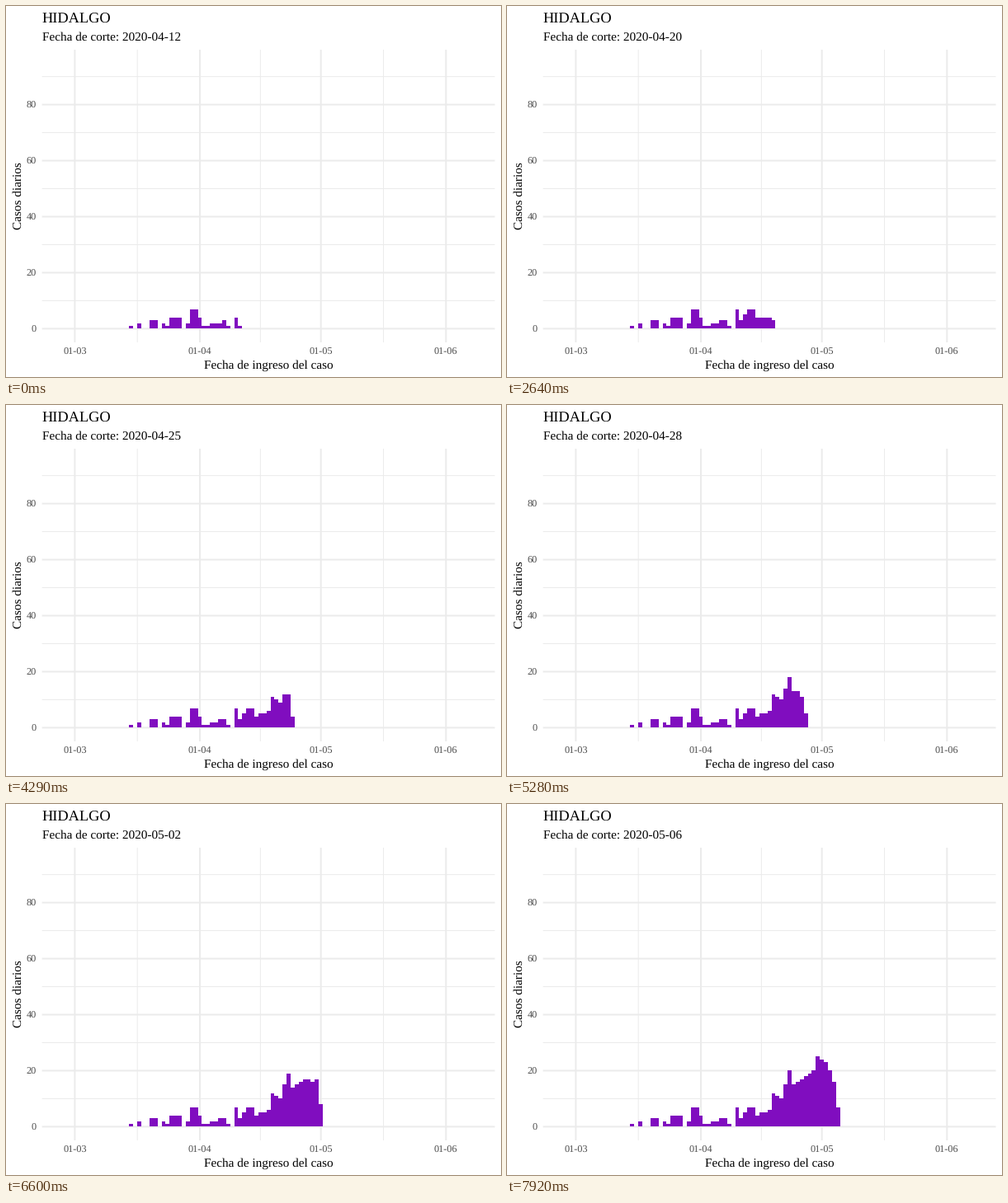
These frames come from a looping animation (600x450 px, 8000 ms). A matplotlib script:

```python
import numpy as np
import matplotlib.pyplot as plt
from matplotlib.animation import FuncAnimation

W, H, DPI = 600, 450, 100
LOOP_MS, TICK_MS, STEP_MS, STEPS = 8000, 20, 330, 25
DAY_W, DAY_0 = 4.89, 83.4        # pixels per day, x of March 1st
CASE_H, ZERO_Y = 3.3975, 391.4   # pixels per case, y of zero cases
LEFT, RIGHT, TOP, BOTTOM = 43.6, 592.5, 53, 408
TEXT_SCALE = 1.018

plt.rcParams["font.family"] = "Liberation Serif"
plt.rcParams["text.hinting"] = "none"

# Turning points of the full daily curve (day since March 1st, cases)
TURNS = [(14, 1), (20, 3), (23, 1), (24, 4), (26, 4), (28, 2), (29, 7),
         (30, 7), (32, 1), (37, 3), (38, 1), (40, 7), (41, 3), (43, 7),
         (44, 7), (45, 4), (48, 6), (49, 12), (51, 10), (53, 20), (54, 15),
         (59, 21), (60, 27), (65, 25)]
QUIET = (15, 17, 18, 21, 27, 39)  # days without cases

days = np.arange(14, 66)
full = np.interp(days, *zip(*TURNS)) * ~np.isin(days, QUIET)


def reported(step):
    """Each day's cases come in quickly at first, then level off."""
    n = np.clip(42 + step - days, 0, None)
    return np.floor(full * n**2 / (n**2 + 2.5) + 0.5)


def day_x(day):
    return DAY_0 + DAY_W * day


def case_y(cases):
    return ZERO_Y - CASE_H * cases


def bar_tops(step):
    return np.round(case_y(reported(step)))


def label(x, y, text, px, color="black", **kw):
    size = px * TEXT_SCALE * 72 / DPI
    return ax.text(x, y, text, fontsize=size, color=color, **kw)


fig = plt.figure(figsize=(W / DPI, H / DPI), dpi=DPI, facecolor="white")
ax = fig.add_axes([0, 0, 1, 1])
ax.axis("off")

# Grid
months = [day_x(d) for d in (0, 31, 61, 92)]
middles = [(a + b) / 2 for a, b in zip(months, months[1:])]
for xs, cases, px in ((middles, range(10, 91, 20), 0.97),
                      (months, range(0, 81, 20), 1.94)):
    style = dict(colors="#EBEBEB", linewidths=px * 72 / DPI,
                 snap=False, zorder=1)
    ax.hlines([case_y(v) for v in cases], LEFT, RIGHT, **style)
    ax.vlines(xs, TOP, BOTTOM, **style)

# Bars on whole pixels
edges = np.round(day_x(np.append(days, days[-1] + 1) - 0.5))
bars = ax.stairs(bar_tops(0), edges, baseline=round(ZERO_Y), fill=True,
                 color="#800DBF", linewidth=0, snap=False, zorder=2)

# Text
label(LEFT, 21, "HIDALGO", 18)
subtitle = label(LEFT, 42, "", 15)
for v in range(0, 81, 20):
    label(37, case_y(v) + 4.5, str(v), 12, "#4D4D4D", ha="right")
for i, x in enumerate(months):
    label(x, 423, f"01-{i + 3:02d}", 12, "#4D4D4D", ha="center")
label((LEFT + RIGHT) / 2, 440, "Fecha de ingreso del caso", 15, ha="center")
label(18.4, (TOP + BOTTOM) / 2, "Casos diarios", 15, rotation=90,
      rotation_mode="anchor", ha="center", va="baseline")

ax.set_xlim(0, W)
ax.set_ylim(H, 0)


def update(i):
    step = min((i * TICK_MS + TICK_MS // 2) // STEP_MS, STEPS - 1)
    day = 12 + step
    month, day = (4, day) if day <= 30 else (5, day - 30)
    subtitle.set_text(f"Fecha de corte: 2020-{month:02d}-{day:02d}")
    bars.set_data(values=bar_tops(step))
    return bars, subtitle


anim = FuncAnimation(fig, update, frames=LOOP_MS // TICK_MS,
                     interval=TICK_MS, repeat=True, repeat_delay=0)
plt.show()
```
